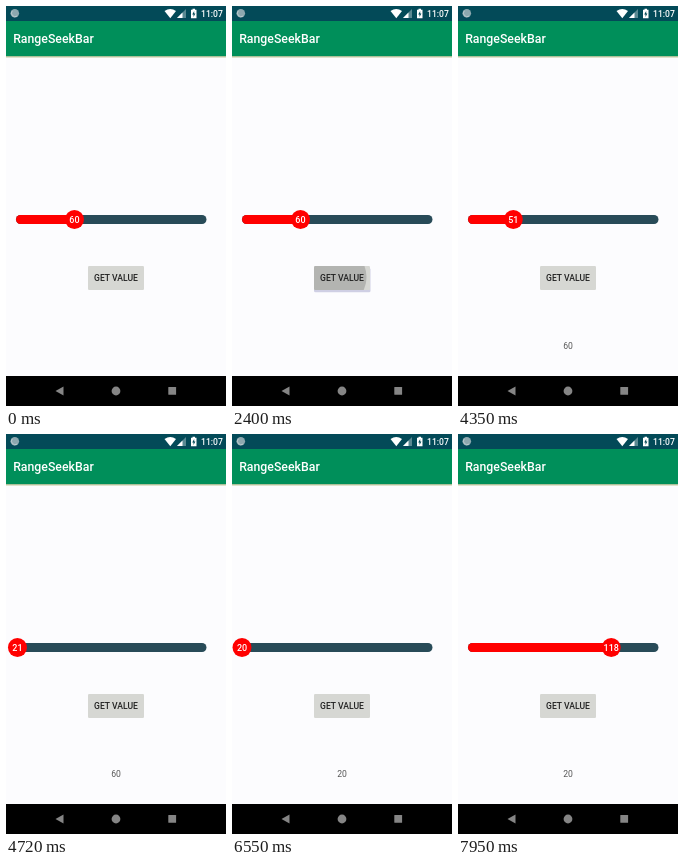
Write an HTML page that moves like this. It is 220 px wide and 400 px high and loops after 8 s.

```html
<!DOCTYPE html>
<html lang="en">
<head>
<meta charset="utf-8">
<title>RangeSeekBar</title>
<style>
  html, body { margin: 0; width: 100%; height: 100%; overflow: hidden; background: #fcfcfe; }
  svg { display: block; width: 100%; height: 100%; }
  text { font: 500 8.6px Roboto, sans-serif; }
  .mid { text-anchor: middle; }
</style>
</head>
<body>
<svg viewBox="0 0 220 400">
  <defs>
    <linearGradient id="barShadow" x2="0" y2="1">
      <stop stop-color="#8fae82"/>
      <stop offset=".5" stop-color="#d8dcc0"/>
      <stop offset="1" stop-color="#fcfcfe"/>
    </linearGradient>
    <clipPath id="buttonClip"><rect x="82" y="260" width="56" height="24" rx="1.2"/></clipPath>
  </defs>
  <rect width="220" height="400" fill="#fcfcfe"/>

  <!-- status bar -->
  <rect width="220" height="15" fill="#034a58"/>
  <circle cx="8.8" cy="7.3" r="4.3" fill="#8da8af"/>
  <path d="M6.3 4.8A3.6 3.6 0 0 0 11.2 10" fill="none" stroke="#c3d0d3" stroke-width=".9"/>
  <g fill="#fff">
    <path d="M158.5 5Q164.3 .8 170 5L164.3 12.3Z"/>
    <path d="M180 3V12H171Z" opacity=".35"/>
    <path d="M176.5 6.5V12H171Z"/>
    <path d="M185 3.8H186.5V2.8H189V3.8H190.5V12.2H185Z"/>
    <path d="M188.2 5L186.2 8.4H187.5V11L189.4 7.5H188.2Z" fill="#034a58"/>
    <text x="195" y="11">11:07</text>
  </g>

  <!-- app bar -->
  <rect y="15" width="220" height="35" fill="#008f5a"/>
  <rect y="50" width="220" height="2.5" fill="url(#barShadow)"/>
  <text x="7.2" y="37.3" fill="#fff" style="font-size:12.3px">RangeSeekBar</text>

  <!-- slider -->
  <rect x="10" y="209" width="190.5" height="9" rx="4.5" fill="#284b58"/>
  <rect id="fill" x="10" y="209" height="9" rx="4.5" fill="#f00"/>
  <g id="thumb" fill="#fff">
    <circle cy="213.5" r="9.5" fill="#f00"/>
    <text id="number" class="mid" y="216.8" style="font-size:9px"></text>
  </g>

  <!-- button -->
  <rect id="shadow" x="82" y="262" width="56.5" height="24.3" rx="1.5" fill="#cfcfe4"/>
  <g clip-path="url(#buttonClip)">
    <rect x="82" y="260" width="56" height="24" fill="#d6d7d3"/>
    <circle id="ripple" cx="104" cy="271" fill="#555"/>
  </g>
  <text class="mid" x="110" y="275.1" fill="#222">GET VALUE</text>
  <text id="result" class="mid" x="110" y="343.3" fill="#555" style="font-weight:400"></text>

  <!-- navigation bar -->
  <rect y="370" width="220" height="30" fill="#000"/>
  <g fill="#858585">
    <path d="M57.5 380.5V389.5L49.5 385Z"/>
    <circle cx="110" cy="385" r="4.4"/>
    <rect x="162.3" y="381" width="7.8" height="7.8" rx=".5"/>
  </g>
</svg>
<script>
const LOOP = 8000, MIN = 20, MAX = 150, TRACK = 190;
const PRESSES = [2240, 5920];
const get = id => document.getElementById(id);
const progress = (t, from, to) => Math.min(1, Math.max(0, (t - from) / (to - from)));
const easeInOut = p => p < .5 ? (2 * p) ** 2.6 / 2 : 1 - (2 - 2 * p) ** 2.6 / 2;

function sliderValue(t) {
  if (t < 7460) return 60 - 40 * easeInOut(progress(t, 4080, 4810));
  return 20 + 98 * progress(t, 7460, 7950) ** 1.5;
}

function resultText(t) {
  if (t >= 2500 && t < 4780) return '60';
  return t >= 6180 ? '20' : '';
}

function drawPress(t) {
  const age = t - (t < PRESSES[1] ? PRESSES[0] : PRESSES[1]);
  const fade = 1 - progress(age, 260, 620);
  get('shadow').setAttribute('opacity', age < 0 ? 0 : (.6 + .4 * progress(age, 0, 100)) * fade);
  get('ripple').setAttribute('r', 36 * progress(age, 0, 190));
  get('ripple').setAttribute('opacity', .27 * progress(age, 0, 100) * fade);
}

function draw(now) {
  const t = now % LOOP;
  const value = Math.round(sliderValue(t));
  const x = 10 + TRACK * (value - MIN) / (MAX - MIN);
  get('fill').setAttribute('width', x - 10);
  get('thumb').setAttribute('transform', `translate(${x})`);
  get('number').textContent = value;
  get('result').textContent = resultText(t);
  drawPress(t);
  requestAnimationFrame(draw);
}
draw(performance.now());
</script>
</body>
</html>
```
